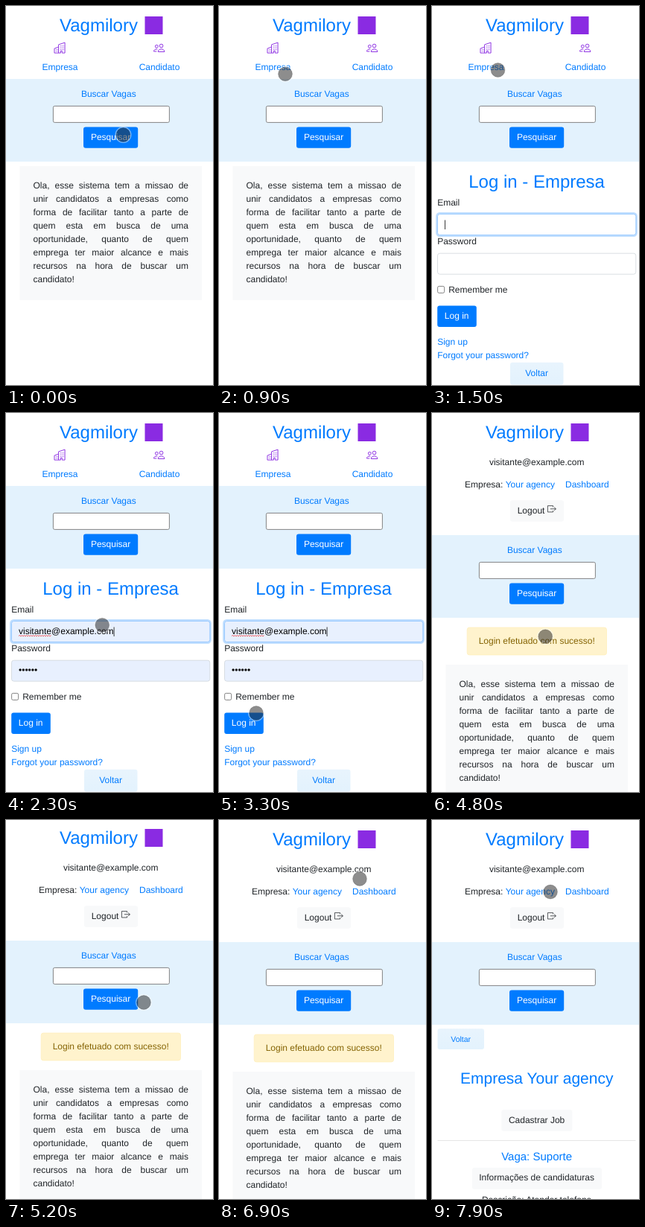
An HTML page that plays this animation: 278x509 px, repeating every 8000 ms.

```html
<!DOCTYPE html>
<html lang="pt">
<head>
<meta charset="utf-8">
<title>Vagmilory</title>
<style>
  html, body { margin: 0; width: 100%; height: 100%; overflow: hidden; background: #fff; }
  svg { display: block; width: 100vw; height: 100vh; }
  text, p { font: 12px "Liberation Sans", Arial, sans-serif; fill: #212529; text-rendering: geometricPrecision; }
  p { margin: 0; line-height: 18px; text-align: justify; color: #212529; }
  .mid { text-anchor: middle; }
  .link { fill: #007bff; }
  .white { fill: #fff; }
  .h1 { font-size: 24px; }
  .h2 { font-size: 21px; }
  .h3 { font-size: 15px; }
  .small { font-size: 10.5px; }
  .primary { fill: #007bff; }
  .light { fill: #f8f9fa; }
  .pale { fill: #e3f2fd; }
  .back { fill: url(#backFill); }
  .field { fill: #fff; stroke: #ced4da; stroke-width: .75; }
  .native { fill: #fff; stroke: #767676; stroke-width: .9; }
  .icon { fill: none; stroke: #8a2be2; }
  #status text { font: 13px "DejaVu Sans", sans-serif; fill: #3c4043; }
</style>
</head>
<body>
<svg viewBox="0 0 278 509">
  <linearGradient id="backFill" x2="0" y2="1">
    <stop stop-color="#e8f4fd"/>
    <stop offset="1" stop-color="#e3f2fd"/>
  </linearGradient>

  <g id="page">
    <text class="link h1" x="72" y="33.7">Vagmilory</text>
    <rect x="186.5" y="14" width="24" height="24" fill="#8a2be2"/>

    <g id="guestMenu">
      <g class="icon" transform="translate(64.5 48.5) scale(.94)">
        <path d="M.5 15.5V9.2l6-2.4V3.6l9-3v14.9h-4v-3h-2v3zM6.5 6.8v8.7"/>
        <path d="M9 5.5h5M9 8h5M9 10.5h5M2.5 10.5h3M2.5 13h3" stroke-dasharray="1 1"/>
      </g>
      <g class="icon" transform="translate(198 48.5) scale(.96)">
        <circle cx="11" cy="5.2" r="2.4"/>
        <circle cx="4.5" cy="6" r="2"/>
        <path d="M6.5 13.5c0-5 9-5 9 0zM5.5 10c-3-.6-5 1-5 3h4"/>
      </g>
      <text class="link mid" x="72.5" y="85.6">Empresa</text>
      <text class="link mid" x="206" y="85.6">Candidato</text>
    </g>

    <g id="userMenu">
      <text class="mid" x="140.7" y="69.7">visitante@example.com</text>
      <text x="44" y="99.7">Empresa:</text>
      <text class="link" x="98.7" y="99.7">Your agency</text>
      <text class="link" x="179" y="99.7">Dashboard</text>
      <rect class="light" x="105" y="117.2" width="72" height="28.5" rx="3"/>
      <text x="114.7" y="134.7">Logout</text>
      <path d="M10 11v2.5H.5v-11H10V5M5 8h10M12 5l3 3-3 3" transform="translate(155 122.7) scale(.76)"
        fill="none" stroke="#212529"/>
    </g>

    <g id="search">
      <rect class="pale" y="98" width="278" height="111"/>
      <text class="link mid" x="137.8" y="121.7">Buscar Vagas</text>
      <rect class="native" x="63.4" y="134.4" width="156" height="22" rx="2"/>
      <rect class="primary" x="104" y="162.6" width="73.2" height="28.2" rx="3"/>
      <text class="white mid" x="140.6" y="179.7">Pesquisar</text>
    </g>

    <g id="alert">
      <rect x="47.2" y="288.1" width="187.3" height="36.8" rx="3" fill="#fff3cd" stroke="#ffeeba" stroke-width=".75"/>
      <text class="mid" x="140.7" y="309.7" style="fill:#856404">Login efetuado com sucesso!</text>
    </g>

    <g id="intro">
      <rect class="light" x="18.5" y="215" width="244.5" height="180"/>
      <foreignObject x="36.5" y="231.7" width="208.5" height="150">
        <p>Ola, esse sistema tem a missao de unir candidatos a empresas como forma de facilitar tanto a parte de quem esta em busca de uma oportunidade, quanto de quem emprega ter maior alcance e mais recursos na hora de buscar um candidato!</p>
      </foreignObject>
    </g>

    <g id="login">
      <text class="link mid h1" x="140.6" y="243.7">Log in - Empresa</text>
      <text x="7.2" y="267.7">Email</text>
      <rect id="ring" x="6.3" y="278.3" width="268.4" height="30.4" rx="4" fill="none" stroke="#007bff" stroke-opacity=".25" stroke-width="2.4"/>
      <rect id="email" class="field" x="7.5" y="279.5" width="266.3" height="28" rx="3"/>
      <text x="7.2" y="319.7">Password</text>
      <rect id="password" class="field" x="7.5" y="332.2" width="266.3" height="28" rx="3"/>
      <g id="filled">
        <text id="address" x="17" y="296.9" style="fill:#000">visitante@example.com</text>
        <text x="17" y="349.1" style="fill:#000">••••••</text>
        <path id="squiggle" fill="none" stroke="#e33" stroke-width=".8"/>
      </g>
      <path id="caret" d="M0 287.5v12.5" stroke="#222" stroke-width=".9"/>
      <rect class="native" x="7.6" y="376.4" width="9" height="9" rx="1.8"/>
      <text x="22.2" y="384.7">Remember me</text>
      <g id="submit">
        <rect class="primary" x="7.2" y="402.4" width="52.6" height="28.5" rx="3"/>
        <text class="white" x="16.8" y="419.8">Log in</text>
      </g>
      <text class="link" x="7.2" y="454.7">Sign up</text>
      <text class="link" x="7.2" y="472.7">Forgot your password?</text>
      <rect class="back" x="105" y="478.7" width="71.5" height="29.8" rx="3"/>
      <text class="link mid" x="140.6" y="496.7">Voltar</text>
    </g>

    <g id="company">
      <rect class="back" x="7.5" y="280.3" width="62.5" height="27.7" rx="3"/>
      <text class="link mid small" x="38.7" y="297.6">Voltar</text>
      <text class="link mid h2" x="140.7" y="353.7">Empresa Your agency</text>
      <rect class="light" x="93.3" y="389.2" width="95" height="28.5" rx="3"/>
      <text class="mid" x="140.6" y="406.7">Cadastrar Job</text>
      <path d="M7.5 430.5h266" stroke="#000" stroke-opacity=".1"/>
      <text class="link mid h3" x="140.6" y="456.7">Vaga: Suporte</text>
      <rect class="light" x="54" y="467" width="174" height="28.7" rx="3"/>
      <text class="mid" x="140.6" y="483.8">Informações de candidaturas</text>
      <text class="mid" x="140.6" y="513.5">Descrição: Atender telefone</text>
    </g>
  </g>

  <g id="status">
    <path d="M0 493h87q4 0 4 4v12H0z" fill="#dee0e4"/>
    <text x=".5" y="509">Aguardand...</text>
  </g>
  <g id="touch">
    <circle r="10.3" fill="none" stroke="#fff" stroke-opacity=".45" stroke-width="1.4"/>
    <circle r="9.4" fill="#282828" fill-opacity=".53" stroke="#444" stroke-opacity=".35" stroke-width=".8"/>
  </g>
  <path id="arrow" d="M.5.5v17.8l4-3.3 2.7 5.7 3-1.4-2.6-5.6 5-.7z" fill="#f6f6f6" stroke="#555" stroke-width=".9"/>
</svg>

<script>
const LOOP = 8000, STEP = 100;
const LOGIN = 1200, FILL = 2200, SUBMIT = 3900, HOME = 4500, COMPANY = 7800;
const $ = id => document.getElementById(id);

// Pointer path: time, x, y
const path = [
  [100, 157.5, 173], [200, 158, 178], [500, 90, 102], [700, 90, 102], [1000, 88.5, 86],
  [1700, 88.5, 86], [2400, 136, 318], [2600, 136, 318], [3300, 50, 403], [3500, 41, 416],
  [3800, 41, 416], [4200, 144, 314], [4700, 144, 314], [5200, 185, 245], [6500, 185, 245],
  [6700, 206, 175], [6800, 207, 115], [6900, 189, 79], [7100, 173, 88], [7300, 160, 97],
  [7400, 165, 101], [7600, 159, 96.5]
];

const between = (t, from, to) => t >= from && t < to;
const ramp = (t, start, length) => Math.min(1, Math.max(0, (t - start) / length));
const show = (id, on) => { $(id).style.display = on ? "" : "none"; };
const move = (id, x, y) => $(id).setAttribute("transform", `translate(${x} ${y})`);

function pointer(t) {
  const i = path.findIndex(key => key[0] > t);
  if (i < 0) return path[path.length - 1].slice(1);
  if (i === 0) return path[0].slice(1);
  const [t0, x0, y0] = path[i - 1], [t1, x1, y1] = path[i];
  const k = ramp(t, t0, t1 - t0);
  return [x0 + (x1 - x0) * k, y0 + (y1 - y0) * k];
}

function drawLogin(t) {
  const filled = t >= FILL, focus = ramp(t, LOGIN, 200) * (1 - ramp(t, SUBMIT, 200));
  show("filled", filled);
  show("squiggle", t < SUBMIT);
  $("ring").style.opacity = focus;
  $("email").style.stroke = focus > .5 ? "#80bdff" : "#ced4da";
  for (const id of ["email", "password"]) $(id).style.fill = filled ? "#e8f0fe" : "#fff";
  $("submit").style.opacity = 1 - .35 * ramp(t, SUBMIT, 200);

  const blinkStart = filled ? FILL : 1300;
  show("caret", between(t, 1300, SUBMIT) && (t - blinkStart) % 1000 < 500);
  move("caret", filled ? 17.5 + $("address").getComputedTextLength() : 17.5, 0);
  if (filled) {
    const end = 17 + $("address").getSubStringLength(0, 9);
    let d = "M17 299.5";
    for (let x = 18.5, up = true; x < end; x += 1.5, up = !up) d += `L${x} ${up ? 298.5 : 300}`;
    $("squiggle").setAttribute("d", d);
  }
}

function draw(t) {
  const signedIn = t >= HOME, atLogin = between(t, LOGIN, HOME);
  show("guestMenu", !signedIn);
  show("userMenu", signedIn);
  show("login", atLogin);
  show("alert", between(t, HOME, COMPANY));
  show("intro", t < LOGIN || between(t, HOME, COMPANY));
  show("company", t >= COMPANY);
  move("search", 0, signedIn ? 66 : 0);
  move("intro", 0, signedIn ? 123 : 0);
  move("page", 0, between(t, 4900, 5900) ? -2 : 0);
  if (atLogin) drawLogin(t);

  const isArrow = between(t, 4200, 4800);
  show("status", isArrow);
  show("arrow", isArrow);
  show("touch", !isArrow);
  move(isArrow ? "arrow" : "touch", ...pointer(t));
}

function tick() {
  draw(Math.floor(performance.now() % LOOP / STEP) * STEP);
  requestAnimationFrame(tick);
}
tick();
</script>
</body>
</html>
```
